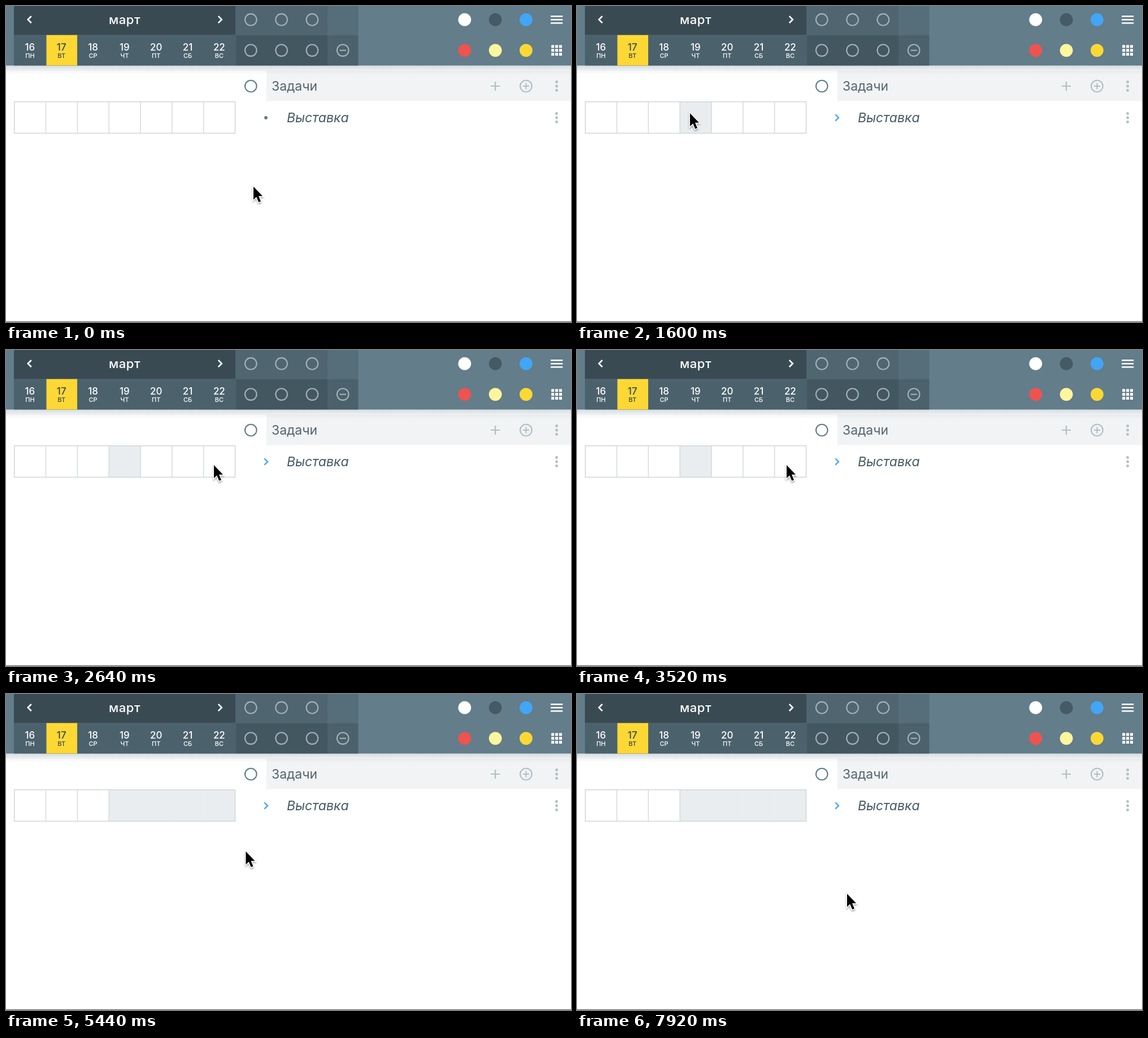
Animation, 1000 px wide and 560 px high, one loop 8720 ms. Source, as an HTML page:

```html
<!DOCTYPE html>
<html lang="ru">
<head>
<meta charset="utf-8">
<style>
  html, body { margin: 0; width: 100%; height: 100%; overflow: hidden; background: #fff; }
  svg { display: block; width: 100vw; height: 100vh; font-family: Inter, Roboto, sans-serif; }
</style>
</head>
<body>
<svg id="stage" viewBox="0 0 1000 560">
  <defs>
    <linearGradient id="shade" x2="0" y2="1">
      <stop offset="0" stop-color="#607d8b" stop-opacity=".24"/>
      <stop offset=".5" stop-color="#607d8b" stop-opacity=".08"/>
      <stop offset="1" stop-color="#607d8b" stop-opacity="0"/>
    </linearGradient>
    <filter id="drop" x="-50%" y="-30%" width="220%" height="180%">
      <feDropShadow dx="0" dy="2" stdDeviation="1.6" flood-opacity=".4"/>
    </filter>
  </defs>
</svg>
<script>
const LOOP = 8720, STEP = 80;
const LEFT = 14.7, CELL = 55.83, TOP = 169.7, BOTTOM = 225.6;
const stage = document.getElementById('stage');

function add(tag, attrs, text) {
  const el = document.createElementNS(stage.namespaceURI, tag);
  for (const k in attrs) el.setAttribute(k, attrs[k]);
  if (text) el.textContent = text;
  return stage.appendChild(el);
}
const rect = (x, y, w, h, fill) => add('rect', { x, y, width: w, height: h, fill });
const dot = (cx, cy, r, fill) => add('circle', { cx, cy, r, fill });
const ring = (cx, cy, stroke) =>
  add('circle', { cx, cy, r: 10.3, fill: 'none', stroke, 'stroke-width': 2.1 });
const line = (d, stroke, width) =>
  add('path', { d, fill: 'none', stroke, 'stroke-width': width });
const label = (x, y, size, fill, text, more) =>
  add('text', { x, y, 'font-size': size, fill, ...more }, text);
const more = y => [-7.5, 0, 7.5].forEach(d => dot(974.6, y + d, 2.4, '#b0bec5'));

// Task list
rect(461, 106, 539, 62.5, '#f1f3f4');
rect(0, 105, 1000, 10, '#f8f9fa');
rect(0, 105, 1000, 17, 'url(#shade)');
ring(433.3, 142, '#607d8b');
label(470, 150, 23, '#546570', 'Задачи');
label(497, 206, 23, '#455a64', 'Выставка', { 'font-style': 'italic' });
line('M858 142h16M866 134v16', '#b0bec5', 2.2);
ring(920.4, 142, '#b0bec5');
line('M915 142h11M920.5 136.5v11', '#b0bec5', 2.1);
more(142);
more(198);

// Header
rect(0, 0, 1000, 105.5, '#637d8a');
rect(14, 0, 392.5, 51.5, '#3a4a52');
rect(14, 51.5, 392.5, 54, '#4b626d');
rect(406.5, 0, 162.5, 51.5, '#4f6671');
rect(569, 0, 54.5, 51.5, '#566e7a');
rect(406.5, 51.5, 162.5, 54, '#435761');
rect(569, 51.5, 54.5, 54, '#4b616c');
rect(71.5, 51.5, 54.5, 54, '#fdd835');

label(210, 31.5, 22, '#fff', 'март', { 'text-anchor': 'middle', 'font-weight': 500, 'letter-spacing': .5 });
line('M44.8 18L38.8 24l6 6M375.8 18l6 6l-6 6', '#fff', 2.6);
'ПН ВТ СР ЧТ ПТ СБ ВС'.split(' ').forEach((day, i) => {
  const x = 42.4 + i * CELL, fill = i === 1 ? '#37474f' : '#fff';
  label(x, 79, 17, fill, 16 + i, { 'text-anchor': 'middle', 'font-weight': 500 });
  label(x, 92.3, 11, fill, day, { 'text-anchor': 'middle', 'font-weight': 500 });
});

for (const y of [24.2, 78.6])
  for (const x of [433.3, 487.6, 541.9]) ring(x, y, '#a5b2b9');
ring(596.2, 78.6, '#a5b2b9');
line('M590.5 78.6h11.4', '#a5b2b9', 2.1);
['#fff', '#455a64', '#42a5f5', '#ef5350', '#fff59d', '#fdd835'].forEach((fill, i) =>
  dot(811.8 + i % 3 * 54.3, i < 3 ? 24.2 : 78.6, 11.4, fill));
line('M964 18.2h21.3M964 24.2h21.3M964 30.2h21.3', '#fff', 2.4);
for (let i = 0; i < 9; i++)
  rect(965.2 + i % 3 * 6.9, 69.2 + Math.floor(i / 3) * 6.9, 5, 5, '#fff');

// Week grid
const cells = [3, 4, 5, 6].map(i =>
  rect(LEFT + i * CELL, TOP, CELL, BOTTOM - TOP, '#e9edf0'));
const dividers = [];
for (let i = 1; i < 7; i++)
  dividers[i] = line(`M${LEFT + i * CELL} ${TOP}V${BOTTOM}`, '#d2d8db', 1.4);
line(`M${LEFT} ${TOP}H405.6V${BOTTOM}H${LEFT}Z`, '#d0d6d9', 1.5);

const bullet = dot(460, 198, 2.9, '#607d8b');
const arrow = line('M457.3 192.4l5.8 5.6l-5.8 5.6', '#42a5f5', 2.3);
rect(0, 558.8, 1000, 1.2, '#6b6b6b');

const cursor = add('path', {
  d: 'M1 2V25.2L6.2 20.2L10.2 29.8L14 28.2L10 18.8H17Z',
  stroke: '#fff', 'stroke-width': 2.8, 'paint-order': 'stroke', filter: 'url(#drop)'
});

// Cursor stops: time, x, y
const path = [
  [480, 437, 318], [1040, 200, 188], [1200, 199, 188],
  [2000, 199, 188], [2640, 367, 202], [2720, 370, 202],
  [5120, 370, 202], [5760, 477, 352]
];
const ramp = (t, from, to) => Math.min(1, Math.max(0, (t - from) / (to - from)));
const ease = p => p * p * (3 - 2 * p);

function cursorAt(t) {
  let [, x, y] = path[0];
  for (let i = 1; i < path.length; i++) {
    const [t0, x0, y0] = path[i - 1], [t1, x1, y1] = path[i];
    const p = ease(ramp(t, t0, t1));
    x += (x1 - x0) * p;
    y += (y1 - y0) * p;
  }
  return [x, y];
}

function draw(time) {
  const t = Math.floor(time % LOOP / STEP) * STEP;
  const first = ease(ramp(t, 1280, 1600)), rest = ease(ramp(t, 3680, 4080));
  cells.forEach((cell, i) => cell.setAttribute('opacity', i ? rest : first));
  for (let i = 4; i < 7; i++) dividers[i].setAttribute('opacity', 1 - rest);
  bullet.setAttribute('opacity', 1 - first);
  arrow.setAttribute('opacity', first);
  cursor.setAttribute('transform', `translate(${cursorAt(t)})`);
}

const start = performance.now();
function tick() {
  draw(performance.now() - start);
  requestAnimationFrame(tick);
}
tick();
</script>
</body>
</html>
```
